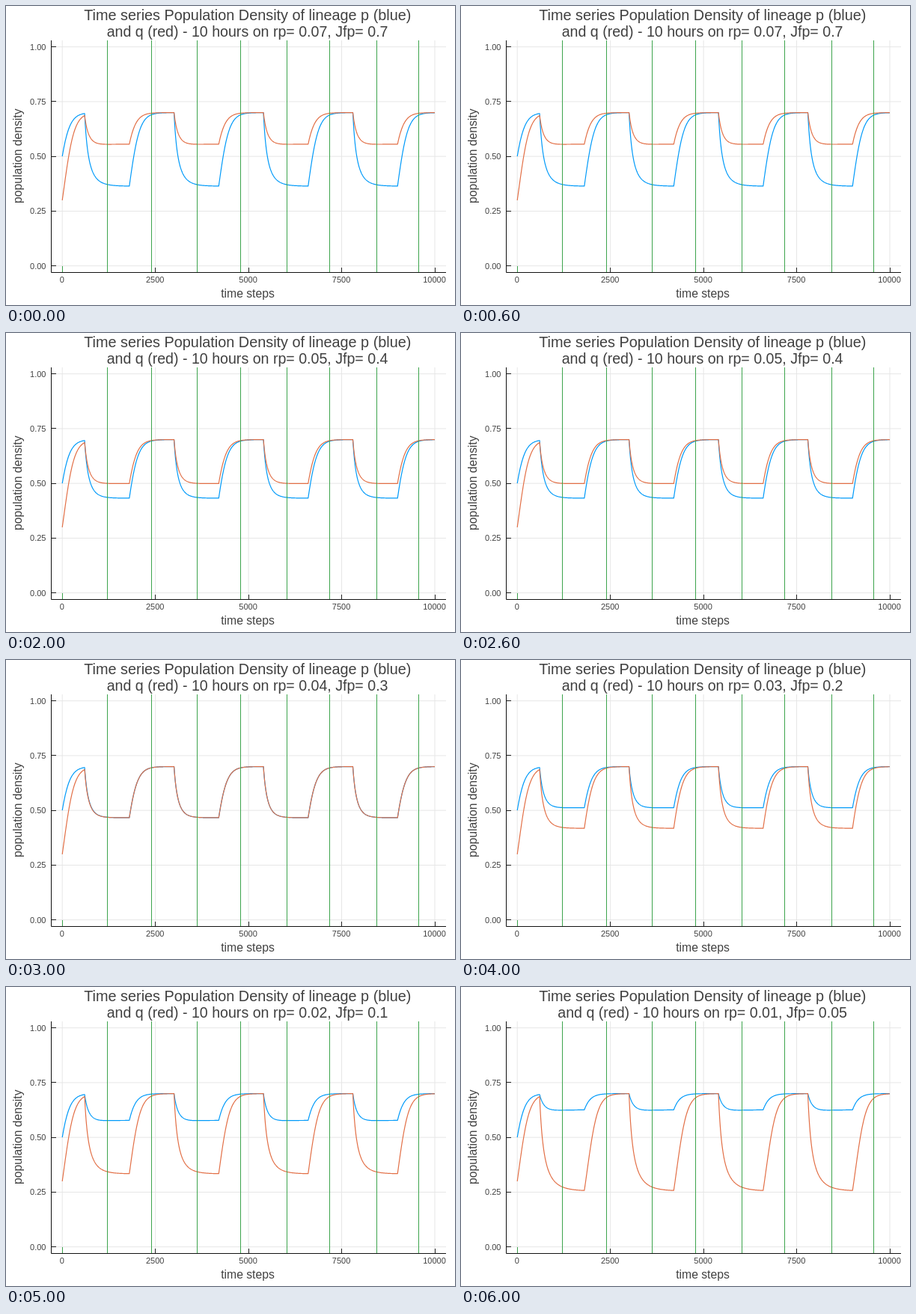
Recreate the animation shown at these times as an HTML page. Size 600x400 px, loop 7000 ms.

```html
<!DOCTYPE html>
<html lang="en">
<head>
<meta charset="utf-8">
<title>Population density</title>
<style>
html, body { margin: 0; width: 100%; height: 100%; overflow: hidden; background: #fff; }
svg { display: block; width: 600px; height: 400px; font-family: "Liberation Sans", Arial, sans-serif; fill: #404040; }
path { fill: none; stroke-width: 1; stroke-linejoin: round; }
.title { font-size: 19.85px; text-anchor: middle; }
.subtitle { font-size: 19.6px; text-anchor: middle; }
.label { font-size: 15.7px; text-anchor: middle; }
.tick { font-size: 11px; }
.run { visibility: hidden; animation: show 7s step-end infinite; }
.run path { stroke-width: 1.2; }
@keyframes show {
  0% { visibility: visible; }
  14.2857%, 100% { visibility: hidden; }
}
</style>
</head>
<body>
<svg id="plot" viewBox="0 0 600 400">
  <text class="title" x="322.8" y="19">Time series Population Density of lineage p (blue)</text>
  <text class="label" x="323" y="390">time steps</text>
  <text class="label" transform="translate(21 200.7) rotate(-90)">population density</text>
</svg>
<script>
const plot = document.getElementById("plot");
const X = t => 75.2 + t * 0.04978;
const Y = v => 347.7 - v * 293;

function add(parent, tag, attrs, text) {
  const el = document.createElementNS("http://www.w3.org/2000/svg", tag);
  for (const k in attrs) el.setAttribute(k, attrs[k]);
  if (text) el.textContent = text;
  return parent.appendChild(el);
}
const line = (d, stroke, parent = plot) => add(parent, "path", { d, stroke });

// Logistic growth; the lineages compete in every second 1200-step phase.
function simulate(J) {
  let p = 0.5, q = 0.3;
  const ps = [], qs = [];
  for (let t = 0; t <= 10000; t++) {
    if (t % 10 === 0) {
      const x = X(t).toFixed(2);
      ps.push(x + " " + Y(p).toFixed(2));
      qs.push(x + " " + Y(q).toFixed(2));
    }
    const compete = Math.floor((t + 600) / 1200) % 2;
    const a = J * p / (J * p + 0.3 * q);
    const dp = 0.01 * p * (0.7 - p - compete * a * q);
    const dq = 0.01 * q * (0.7 - q - compete * (1 - a) * p);
    p += dp;
    q += dq;
  }
  return [ps, qs].map(s => "M" + s.join("L"));
}

// Grid, ticks and axes
const green = "#3da44d";
const marks = [0, 1, 2, 3, 4];
const snap = v => Math.floor(v) + 0.5;
for (const i of marks) {
  line(`M${X(i * 2500)} 46V356M61 ${Y(i / 4)}H588`, "#e6e6e6");
}
for (const i of marks) {
  const x = X(i * 2500), y = Y(i / 4);
  line(`M${snap(x)} 356v-6M61 ${snap(y)}h6`, "#222");
  add(plot, "text", { class: "tick", x: x - 0.5, y: 370, "text-anchor": "middle" }, String(i * 2500));
  add(plot, "text", { class: "tick", x: 53.5, y: y + 3.8, "text-anchor": "end" }, (i / 4).toFixed(2));
}
line("M60.5 46V356.5H588", "#111");

// One curve pair and subtitle per parameter set
[0.7, 0.6, 0.4, 0.3, 0.2, 0.1, 0.05].forEach((J, i) => {
  const g = add(plot, "g", { class: "run", style: `animation-delay:${i - 7}s` });
  const [p, q] = simulate(J);
  line(p, "#009af9", g);
  line(q, "#e26f46", g);
  add(g, "text", { class: "subtitle", x: 322.6, y: 41 },
    `and q (red) - 10 hours on rp= ${(0.07 - i * 0.01).toFixed(2)}, Jfp= ${J}`);
});

for (const x of [135, 194, 255, 313, 375, 432, 495, 551]) line(`M${x + 0.5} 46V356`, green);
line("M75.5 348V356", green);
</script>
</body>
</html>
```
